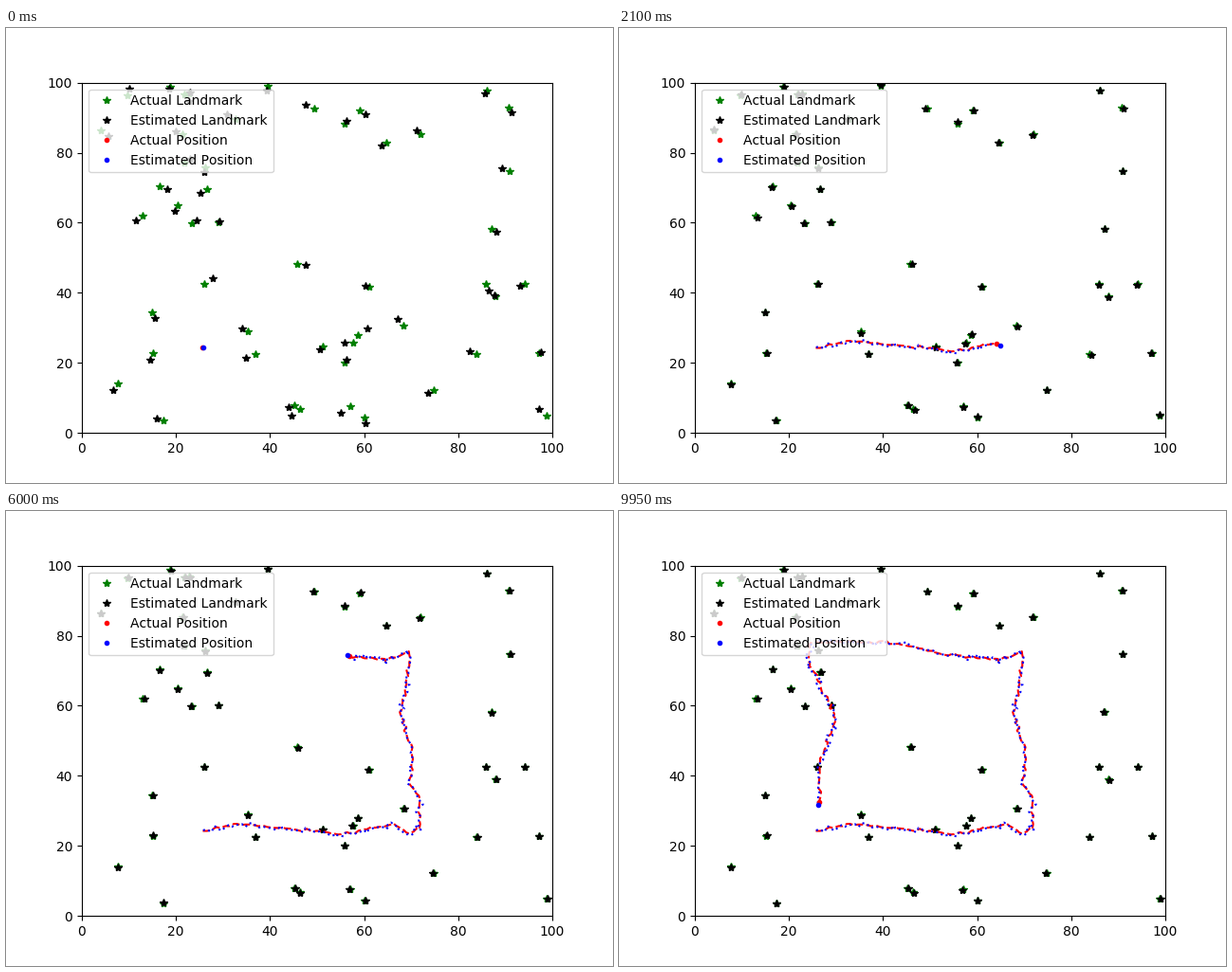
A matplotlib script for the animation above (10 s loop, 640 by 480 pixels).

```python
import numpy as np
import matplotlib.pyplot as plt
from matplotlib.animation import FuncAnimation

FRAMES = 200
INTERVAL = 50
SIGHT_RANGE = 2.0    # largest error of one landmark sighting
STEP_NOISE = 0.24
POSITION_NOISE = 0.42

LANDMARKS = np.array([
    (18.8, 98.8), (39.5, 99.1), (49.3, 92.6), (55.9, 88.3), (59.1, 92.1),
    (64.8, 82.8), (72.0, 85.3), (86.1, 97.7), (90.8, 92.8), (90.9, 74.7),
    (87.1, 58.2), (85.9, 42.5), (88.0, 39.0), (94.2, 42.5), (97.2, 22.8),
    (83.8, 22.4), (98.8, 4.9), (74.8, 12.3), (68.4, 30.6), (61.1, 41.7),
    (58.7, 27.9), (57.7, 25.8), (55.9, 20.1), (51.2, 24.6), (57.1, 7.5),
    (60.1, 4.4), (45.2, 7.9), (46.3, 6.7), (45.8, 48.2), (35.3, 28.9),
    (36.9, 22.4), (26.0, 42.5), (14.9, 34.4), (15.2, 22.8), (7.7, 14.0),
    (17.4, 3.7), (13.0, 62.0), (16.5, 70.3), (20.4, 65.0), (23.3, 59.9),
    (29.0, 60.0), (26.7, 69.5), (9.7, 96.4), (21.8, 96.6), (22.8, 96.8),
    (4.1, 86.4), (21.4, 85.3), (21.8, 77.2), (26.2, 75.8), (32.7, 89.6),
])

# Turning points of the robot's round trip: frame, x, y
ROUTE = np.array([
    (0, 25.7, 24.2), (8, 33.3, 26.4), (32, 55.3, 23.4), (44, 66.0, 26.2),
    (48, 69.3, 23.7), (52, 71.9, 24.9), (60, 71.6, 34.5), (64, 69.9, 38.0),
    (72, 70.2, 47.2), (82, 67.9, 57.0), (100, 69.8, 75.3), (106, 64.9, 73.3),
    (120, 57.0, 74.1), (136, 40.3, 78.2), (151, 24.5, 78.0), (156, 24.2, 73.0),
    (176, 30.0, 56.2), (192, 26.2, 42.5), (199, 26.8, 32.7),
])


def robot_paths(rng):
    """Noisy walk along the route, and the noisier guess of it."""
    t, x, y = ROUTE.T
    k = np.arange(FRAMES)
    actual = np.column_stack([np.interp(k, t, x), np.interp(k, t, y)])
    actual += rng.normal(0, STEP_NOISE, actual.shape)
    return actual, actual + rng.normal(0, POSITION_NOISE, actual.shape)


def landmark_estimates(rng):
    """Each estimate is the running mean of all sightings so far."""
    noise = rng.uniform(-SIGHT_RANGE, SIGHT_RANGE, (FRAMES, *LANDMARKS.shape))
    count = np.arange(1, FRAMES + 1)[:, None, None]
    return LANDMARKS + np.cumsum(noise, axis=0) / count


rng = np.random.default_rng(7)
actual, estimated = robot_paths(rng)
landmarks = landmark_estimates(rng)

plt.rcParams["text.kerning_factor"] = 6  # whole-pixel kerning in the legend
fig, ax = plt.subplots(figsize=(6.4, 4.8), dpi=100)
ax.set_xlim(0, 100)
ax.set_ylim(0, 100)

ax.plot(*LANDMARKS.T, "g*", label="Actual Landmark")
stars, = ax.plot([], [], "k*", label="Estimated Landmark")
trail, = ax.plot([], [], "r--")
est_trail, = ax.plot([], [], "b:")
robot, = ax.plot([], [], "r.", label="Actual Position")
est_robot, = ax.plot([], [], "b.", label="Estimated Position")
ax.legend(loc="upper left")


def update(k):
    stars.set_data(*landmarks[k].T)
    for path, line, dot in ((actual, trail, robot),
                            (estimated, est_trail, est_robot)):
        line.set_data(*path[:k + 1].T)
        dot.set_data(*path[k:k + 1].T)
    return stars, trail, est_trail, robot, est_robot


anim = FuncAnimation(fig, update, frames=FRAMES, interval=INTERVAL,
                     repeat=True, repeat_delay=0)
plt.show()
```
